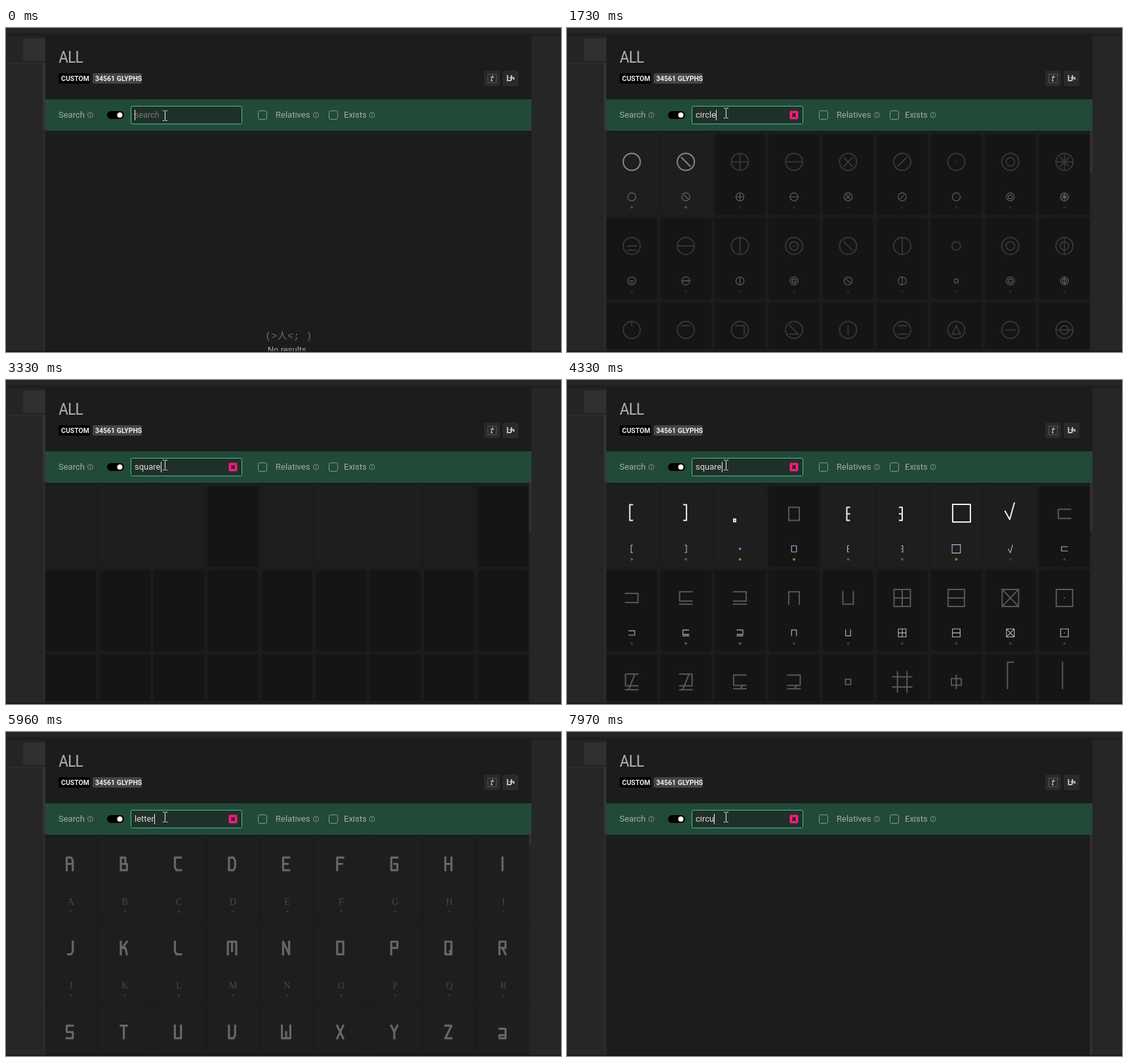
Animation of 846x495 px, one loop 8000 ms. Source, as an HTML page:

```html
<!DOCTYPE html>
<html lang="en">
<head>
<meta charset="utf-8">
<title>Glyph search</title>
<style>
html, body { margin: 0; width: 100%; height: 100%; overflow: hidden; background: #262626; }
#stage { position: relative; width: 846px; height: 495px; overflow: hidden; font: 13px Roboto, sans-serif; }
svg { position: absolute; inset: 0; }
svg text { fill: #aaa; }
.title { font: 400 26.500px "Roboto Condensed", Roboto, sans-serif; font-stretch: 75%; letter-spacing: -1.3px; }
.badge { font-size: 10.5px; font-weight: 600; }
svg .badge { fill: #eee; }
.badge tspan { font-weight: 700; }
.info { fill: none; stroke: #7f9389; }
.box { fill: none; stroke: #87988f; }
.mid { text-anchor: middle; }
svg .face { font: 14.5px "Liberation Mono", "Noto Sans CJK JP", monospace; fill: #707070; white-space: pre; }
.glyph { fill: none; stroke-linejoin: round; stroke-linecap: square; }
svg .small { font: 14px "Liberation Serif", serif; fill: #999; }
#field { position: absolute; left: 196px; top: 125px; height: 16px; line-height: 16px; white-space: pre; color: #ddd; display: flex; }
#hint { position: absolute; left: 0; font-style: italic; color: #727a76; }
#typed.selected { background: #1763c6; color: #fff; }
#caret { width: 1px; height: 16px; background: #eee; }
</style>
</head>
<body>
<div id="stage">
<svg width="846" height="495" viewBox="0 0 846 495">
  <linearGradient id="edge" x2="0" y2="1">
    <stop offset=".5" stop-color="#252525"/><stop offset="1" stop-color="#1c1c1c"/>
  </linearGradient>
  <rect width="846" height="495" fill="#262626"/>
  <rect width="846" height="12" fill="url(#edge)"/>
  <rect y="12" width="60" height="41" fill="#242424"/>
  <path d="M0 53.5H60" stroke="#313131"/>
  <rect x="26" y="16" width="34" height="34" fill="#303030"/>
  <rect x="56" y="54" width="4" height="441" fill="#2a2a2a"/>
  <rect x="56" y="54" width="4" height="101" fill="#353535"/>
  <path d="M843.5 12V495" stroke="#1c1c1c" stroke-dasharray="2 3"/>
  <rect x="60" y="11" width="741" height="484" fill="#1c1c1c"/>

  <text class="title" x="80" y="53">ALL</text>
  <rect x="80" y="69" width="48" height="16" rx="3" fill="#000"/>
  <text class="badge" x="84" y="81">CUSTOM</text>
  <rect x="132" y="69" width="75" height="16" rx="3" fill="#444"/>
  <text class="badge" x="136" y="81"><tspan>34561</tspan> GLYPHS</text>
  <rect x="729" y="65" width="24" height="24" rx="3" fill="#2a2a2a"/>
  <rect x="757" y="65" width="24" height="24" rx="3" fill="#2a2a2a"/>
  <rect x="734.5" y="70.5" width="13" height="13" fill="none" stroke="#555"/>
  <path d="M742 72.5L739.5 80Q739.5 81.5 742 80.500M738.5 75H744" fill="none" stroke="#ccc" stroke-width="1.2"/>
  <path d="M764.5 72V80.5H767.5Q770.5 80.5 770.5 77.5V72M767.5 76H775M774 76V79" fill="none" stroke="#ddd" stroke-width="1.7"/>

  <rect x="60" y="109" width="741" height="48" fill="#224a38"/>
  <text x="80" y="137">Search</text>
  <text x="411" y="137">Relatives</text>
  <text x="515" y="137">Exists</text>
  <g id="infos"></g>
  <rect x="154" y="127" width="26" height="12" rx="6" fill="#000"/>
  <circle cx="173.5" cy="133" r="4" fill="#fff"/>
  <rect x="190.5" y="119.5" width="169" height="27" rx="2" fill="#202f29" stroke="#42c48e"/>
  <rect class="box" x="384.5" y="126.5" width="13" height="13" rx="2"/>
  <rect class="box" x="492.5" y="126.5" width="13" height="13" rx="2"/>
  <g id="clear">
    <rect x="339.5" y="126.5" width="13" height="13" rx="2" fill="#e81f7c"/>
    <path d="M343.5 130.5l5 5m0-5l-5 5" stroke="#26151d" stroke-width="2"/>
  </g>
  <rect id="bar" x="60" y="155" height="2" fill="#42c48e"/>

  <g id="none" class="mid">
    <text class="face" x="431" y="475" letter-spacing=".7">(&gt;人&lt;; )</text>
    <text x="430" y="496">No results.</text>
  </g>
  <g id="busy" class="mid">
    <text class="face" x="431" y="466">o(*￣▽￣).</text>
    <text x="430" y="486">Searching...</text>
  </g>
  <clipPath id="view"><rect x="60" y="157" width="737" height="333"/></clipPath>
  <g id="grids" clip-path="url(#view)"></g>
  <g id="scroll">
    <rect x="797" y="157" width="4" height="338" fill="#232323"/>
    <rect id="thumb" x="797" y="157" width="4" fill="#303030"/>
  </g>
  <rect y="493" width="846" height="2" fill="#181315" opacity=".7"/>
</svg>
<div id="field"><span id="hint">search</span><span id="typed"></span><i id="caret"></i></div>
<svg width="846" height="495">
  <path id="pointer" d="M239 122.5h2.5l1 1 1-1h2.5M239 137.5h2.5l1-1 1 1h2.5M242.5 123.5v13" fill="none" stroke="#eee"/>
</svg>
</div>
<script>
const $ = id => document.getElementById(id);

// Strokes join points of a 5 by 5 lattice, lettered a to y row by row.
// O is the enclosing circle, Q a circle half that size.
function strokes(code, w, h) {
  return code.split(" ").map(part => {
    if (part === "O" || part === "Q") {
      const r = part === "O" ? w / 2 : w / 4;
      return `M${-r} 0a${r} ${r} 0 1 1 ${2 * r} 0a${r} ${r} 0 1 1 ${-2 * r} 0`;
    }
    return "M" + [...part].map(c => {
      const i = c.charCodeAt(0) - 97;
      return `${(i % 5 / 4 - .5) * w} ${((i / 5 | 0) / 4 - .5) * h}`;
    }).join("L");
  }).join("");
}

const letterCodes = ("uadjy ko,adnkoyua,eapvy,adjtxua,eauy kn,eau kn,eauyom,au ey ko,cw," +
  "etxv,au kle lny,apvy,uaey cr,uaye,aeyua,uaeok,aeyua sy,uaeok my," +
  "eakoyu,ae cw,auye,auxte,auye mw,ay eu,amw em,aeuy,fjyupt").split(",");
const circleCodes = ("O,O gs,O cw ko,O ko,O gs iq,O iq,O mm,O Q,O cw ko gs iq," +
  "O ln qs,O ko,O cw,O Q mm,O gs,O cw,Q,O Q,O cw Q," +
  "O ch,O gi,O gis,O gsq,O hr,O gi qs,O hqsh,O lmn,O Q ko").split(",");

// code, outer width and height, then the shifts of the large sign
const squares = [
  ["eauy", 6, 26, -1, -2], ["aeyu", 6, 26, -1, -2], ["aeyua", 5, 6, -8, 10], ["aeyua", 18, 22],
  ["eauy ko", 6, 22], ["aeyu ko", 6, 22, -2], ["aeyua", 29, 29, 8, -1], ["kqwe", 16, 27, -1, -4],
  ["eauy", 21, 16], ["aeyu", 21, 16], ["eapt uy", 21, 21], ["aetp uy", 21, 21],
  ["uaey", 18, 21], ["auye", 18, 21], ["aeyua cw ko", 27, 28], ["aeyua ko", 27, 28],
  ["aeyua ay eu", 27, 28], ["aeyua mm", 27, 28], ["eapt uy dv", 21, 26], ["aetp uy dv", 21, 26],
  ["eapt uy sw", 21, 23], ["aetp uy sw", 21, 23], ["aeyua", 10, 10], ["bv dx fj pt", 31, 33],
  ["fjtpf cw", 17, 22], ["uae", 11, 42, 0, -10], ["cw", 2, 42, -3, -10]
];

const yellow = "#94801e", olive = "#665c20", violet = "#37375c", green = "#22735a";
const letterWidths = { I: 3, M: 16, W: 16 };
const grids = {
  circle: circleCodes.map((code, i) => ({
    code, w: 28, h: 28, exists: i < 2, dot: i < 2 ? yellow : violet
  })),
  square: squares.map(([code, w, h, dx = 0, dy = 0], i) => ({
    code, w, h, dx, dy, exists: i < 8 && i !== 3,
    dot: [2, 3, 6].includes(i) ? yellow : i < 6 ? olive : i === 10 || i === 11 ? green : violet
  })),
  letter: letterCodes.map((code, i) => {
    const char = i < 26 ? String.fromCharCode(65 + i) : "a";
    return { code, char, w: letterWidths[char] || 12.5, h: 22.5, dx: -1.5, dy: -3, exists: true, dot: green, line: 3.2 };
  })
};

function cell(item, i) {
  const { code, w, h, dx = 0, dy = 0, exists, dot, char, line = 2 } = item;
  const x = 60 + i % 9 * 82.45, y = 162 + (i / 9 | 0) * 128.4;
  const cx = x + 38.7, d = strokes(code, Math.max(0, w - line), h - line);
  const back = `<rect x="${x}" y="${y}" width="77.5" height="124" rx="4" fill="${exists ? "#1e1e1e" : "#151515"}"/>`;
  const small = char
    ? `<text class="small mid" x="${cx}" y="${y + 101.5}">${char}</text>`
    : `<path class="glyph" transform="translate(${cx} ${y + 96}) scale(.47)" d="${d}" stroke="#b5b5b5" stroke-width="2.4"/>`;
  const front = `<path class="glyph" transform="translate(${cx + dx} ${y + 42.5 + dy})" d="${d}"
    stroke="${exists ? "#eee" : "#585858"}" stroke-width="${line}"/>
    ${small}<circle cx="${cx}" cy="${y + 112}" r="2" fill="${dot}"/>`;
  return [back, front];
}

for (const [name, items] of Object.entries(grids)) {
  const cells = items.map(cell);
  $("grids").innerHTML += `<g id="${name}">${cells.map(c => c[0]).join("")}
    <g id="${name}Signs">${cells.map(c => c[1]).join("")}</g></g>`;
}
$("infos").innerHTML = [128.5, 472.5, 558].map(x =>
  `<circle class="info" cx="${x}" cy="133" r="4"/><path class="info" d="M${x} 130v1m0 1v3"/>`).join("");

// time, typed text, view, level (bar share, thumb height or sign opacity), field state
const steps = [
  [0, "", "none"], [510, "", "none", 0, "idle"],
  [710, "c", "busy", .72], [810, "c", "blank", 40], [910, "ci", "busy", .72], [1010, "cir", "blank", 65],
  [1210, "circ", "busy", .72], [1310, "circl", "busy", .72], [1410, "circle", "circle", 0],
  [1730, "circle", "circle", .5], [1830, "circle", "circle", 1, "idle"], [2320, "circle", "circle", 1, "selected"],
  [2630, "s", "busy", .72], [2730, "s", "blank", 16], [2830, "sq", "busy", .72], [2930, "squ", "blank", 74],
  [3030, "squa", "busy", .72], [3130, "squar", "blank", 74], [3230, "square", "busy", .72], [3330, "square", "square", 0],
  [3540, "square", "square", .35], [3640, "square", "square", .7], [3740, "square", "square", 1, "idle"],
  [4330, "square", "square", 1], [4740, "square", "square", 1, "selected"],
  [4940, "l", "busy", .72], [5040, "l", "blank", 16], [5140, "le", "busy", .72], [5340, "let", "blank", 16],
  [5440, "lett", "busy", .72], [5540, "lette", "blank", 16], [5640, "letter", "busy", .72], [5760, "letter", "letter", 0],
  [5960, "letter", "letter", .35], [6060, "letter", "letter", .7], [6160, "letter", "letter", 1, "idle"],
  [6660, "letter", "letter", 1], [6760, "letter", "letter", 1, "selected"],
  [7170, "", "none"], [7470, "c", "busy", .72], [7570, "ci", "blank", 40],
  [7770, "cir", "busy", .72], [7870, "circ", "busy", .72], [7970, "circu", "blank", 338]
];
const thumbs = { circle: 65, square: 74, letter: 16 };
const show = (id, on) => { $(id).style.display = on ? "" : "none"; };

function render([, text, view, level = 0, state]) {
  $("typed").textContent = text;
  $("typed").className = state === "selected" ? "selected" : "";
  show("hint", !text);
  show("clear", text);
  show("caret", !state);
  for (const id of ["none", "busy", ...Object.keys(grids)]) show(id, id === view);
  show("bar", view === "busy");
  if (view === "busy") $("bar").setAttribute("width", 741 * level);
  show("scroll", view !== "none" && view !== "busy");
  $("thumb").setAttribute("height", thumbs[view] || level);
  if (grids[view]) $(view + "Signs").setAttribute("opacity", level);
}

const start = performance.now();
let current;
function tick() {
  const t = Math.max(0, performance.now() - start) % 8000;
  const step = steps.findLast(s => s[0] <= t);
  if (step !== current) render(current = step);
  $("pointer").setAttribute("transform", `translate(0 ${t < 100 ? 4 : 0})`);
  requestAnimationFrame(tick);
}
tick();
</script>
</body>
</html>
```
